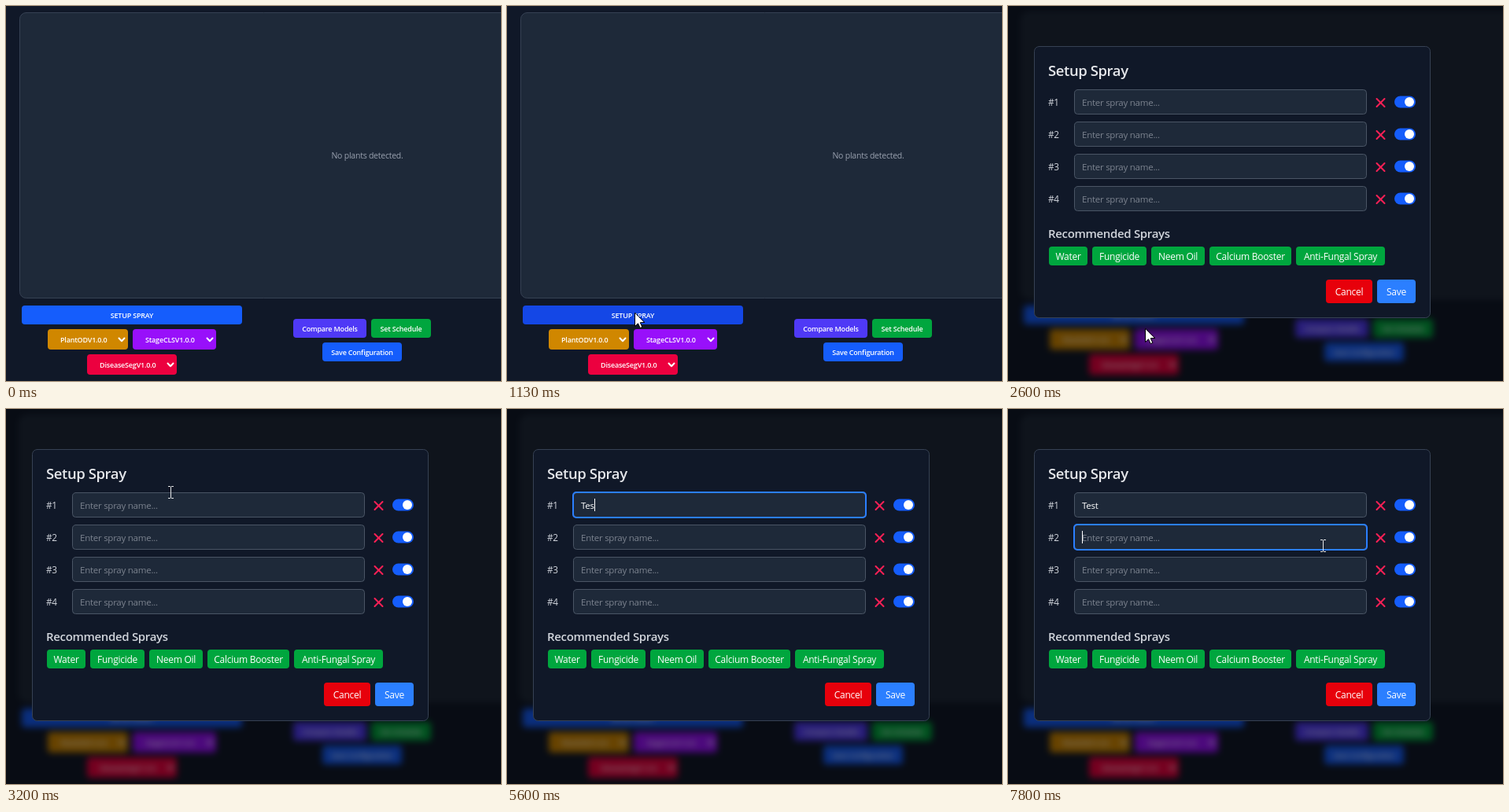
These frames come from a looping animation (629 px wide and 477 px high, 8000 ms). An HTML page with a canvas:

```html
<!DOCTYPE html>
<html lang="en">
<head>
<meta charset="utf-8">
<title>Spray setup</title>
<style>
html, body { margin: 0; width: 100%; height: 100%; overflow: hidden; background: #101828; }
canvas { display: block; }
</style>
</head>
<body>
<canvas id="stage" width="629" height="477"></canvas>
<script>
const W = 629, H = 477, LOOP = 8000, STEP = 1000 / 15, MARGIN = 20;
const ctx = document.getElementById('stage').getContext('2d');

// The page is drawn with a margin so that its blur has no soft outer edge.
const page = document.createElement('canvas');
page.width = W + 2 * MARGIN;
page.height = H + 2 * MARGIN;
const pageCtx = page.getContext('2d');

const OPEN = 1930, FOCUS_1 = 4670, FOCUS_2 = 7600;
const TYPING = [[5270, 'T'], [5470, 'Te'], [5600, 'Tes'], [5800, 'Test']];
const BLINK = 530;

// Pointer keys: time, x, y
const POINTER = [
  [130, 620, 458], [270, 560, 430], [470, 400, 385], [670, 262, 372],
  [800, 192, 380], [930, 166, 389], [1000, 162, 390],
  [2530, 162, 390], [2670, 186, 430], [2800, 230, 457], [2930, 280, 385],
  [3070, 262, 235], [3200, 209, 106], [3330, 151, 117], [3400, 154, 121],
  [3600, 164, 128], [3930, 146, 132],
  [6400, 146, 132], [6530, 245, 135], [6730, 432, 142], [6870, 446, 156],
  [7070, 428, 177], [7270, 412, 176], [7400, 400, 174]
];

const clamp = v => Math.min(1, Math.max(0, v));
const ramp = (t, from, to) => clamp((t - from) / (to - from));

function mix(a, b, k) {
  const part = (c, i) => parseInt(c.substr(1 + 2 * i, 2), 16);
  return `rgb(${[0, 1, 2].map(i => Math.round(part(a, i) + (part(b, i) - part(a, i)) * k))})`;
}

function box(c, x, y, w, h, r, fill, stroke, lineWidth = 1) {
  c.beginPath();
  c.roundRect(x, y, w, h, r);
  if (fill) { c.fillStyle = fill; c.fill(); }
  if (stroke) { c.strokeStyle = stroke; c.lineWidth = lineWidth; c.stroke(); }
}

function setFont(c, size, weight) {
  c.font = `${weight} ${size}px "Open Sans", "Noto Sans", sans-serif`;
  c.letterSpacing = `${-0.022 * size}px`;
}

function label(c, text, x, baseline, size, color, weight = 400, align = 'left') {
  setFont(c, size, weight);
  c.textAlign = align;
  c.fillStyle = color;
  c.fillText(text, x, baseline);
}

function line(c, points, color, width) {
  c.beginPath();
  points.forEach(([x, y]) => c.lineTo(x, y));
  c.strokeStyle = color;
  c.lineWidth = width;
  c.lineCap = c.lineJoin = 'round';
  c.stroke();
}

function button(c, text, x, y, w, h, color, size, weight) {
  box(c, x, y, w, h, 4, color);
  label(c, text, x + w / 2, y + h / 2 + 0.36 * size + 0.5, size, '#fff', weight, 'center');
}

function select(c, text, x, y, w, color) {
  box(c, x, y, w, 26, 4, color);
  label(c, text, x + 16, y + 16.5, 9, '#fff', 600);
  const cx = x + w - 8, cy = y + 13.5;
  line(c, [[cx - 3.5, cy - 2], [cx, cy + 1.7], [cx + 3.5, cy - 2]], '#fff', 2);
}

function drawPage(c, t) {
  const hover = ramp(t, 870, 1130) * (1 - ramp(t, OPEN, 2200));
  c.fillStyle = '#101828';
  c.fillRect(-MARGIN, -MARGIN, page.width, page.height);
  box(c, 17.5, 8.5, 900, 363, 8, '#1e2939', '#364153');
  label(c, 'No plants detected.', 459, 194, 10.5, '#99a1af', 400, 'center');
  button(c, 'SETUP SPRAY', 20, 381, 280, 24, mix('#155dfc', '#1447e6', hover), 9, 600);
  select(c, 'PlantODV1.0.0', 53, 411, 102, '#d08700');
  select(c, 'StageCLSV1.0.0', 161, 411, 106, '#9810fa');
  select(c, 'DiseaseSegV1.0.0', 103, 443, 114, '#ec003f');
  button(c, 'Compare Models', 365, 398, 93, 24, '#4f39f6', 9, 600);
  button(c, 'Set Schedule', 464, 398, 76, 24, '#00a63e', 9, 600);
  button(c, 'Save Configuration', 402, 428, 101, 24, '#155dfc', 9, 600);
}

function drawBackdrop(t) {
  pageCtx.setTransform(1, 0, 0, 1, MARGIN, MARGIN);
  drawPage(pageCtx, t);
  ctx.filter = 'blur(4px)';
  ctx.drawImage(page, -MARGIN, -MARGIN);
  ctx.filter = 'none';
  ctx.fillStyle = 'rgba(0, 0, 0, 0.5)';
  ctx.fillRect(0, 0, W, H);
}

function drawRow(index, text, focus, caret) {
  const y = 106 + 41 * index;
  label(ctx, `#${index + 1}`, 51, y + 20.5, 11.8, '#d1d5dc');
  box(ctx, 84.5, y + 0.5, 371, 31, 4, '#1e2939', '#4a5565');
  if (focus > 0) {
    ctx.globalAlpha = focus;
    box(ctx, 84, y, 372, 32, 4, null, '#2b7fff', 2);
    ctx.globalAlpha = 1;
  }
  label(ctx, text || 'Enter spray name...', 94, y + 21, 11.5, text ? '#fff' : '#7c838f');
  if (caret) {
    const x = 94 + Math.round(text ? ctx.measureText(text).width : 0);
    ctx.fillStyle = '#fff';
    ctx.fillRect(x, y + 8, 1, 16);
  }
  const cx = 473.5, cy = y + 17;
  line(ctx, [[cx - 5, cy - 5], [cx + 5, cy + 5]], '#ff2056', 2);
  line(ctx, [[cx + 5, cy - 5], [cx - 5, cy + 5]], '#ff2056', 2);
  box(ctx, 491, y + 8.5, 27, 15, 7.5, '#155dfc');
  box(ctx, 504, y + 10, 12, 12, 6, '#fff');
}

function drawDialog(t) {
  box(ctx, 33.5, 51.5, 503, 345, 6, '#101828', '#364153');
  label(ctx, 'Setup Spray', 51, 89, 18.5, '#e5e7eb', 600);

  const typed = TYPING.filter(([at]) => t >= at).pop();
  const text = typed ? typed[1] : '';
  const since = t >= FOCUS_2 ? FOCUS_2 : typed ? typed[0] : FOCUS_1;
  const lit = t >= FOCUS_1 && Math.floor((t - since) / BLINK) % 2 === 0;
  const moved = ramp(t, FOCUS_2, FOCUS_2 + 200);
  drawRow(0, text, ramp(t, FOCUS_1, FOCUS_1 + 200) * (1 - moved), lit && t < FOCUS_2);
  drawRow(1, '', moved, lit && t >= FOCUS_2);
  drawRow(2, '', 0, false);
  drawRow(3, '', 0, false);

  label(ctx, 'Recommended Sprays', 51, 295, 15, '#d1d5dc', 600);
  [['Water', 52, 49], ['Fungicide', 107, 69], ['Neem Oil', 182, 68],
   ['Calcium Booster', 256, 104], ['Anti-Fungal Spray', 366, 113]]
    .forEach(([name, x, w]) => button(ctx, name, x, 306, w, 24, '#00a63e', 12, 400));
  button(ctx, 'Cancel', 404, 348, 59, 30, '#e7000b', 12, 400);
  button(ctx, 'Save', 469, 348, 49, 30, '#2b7fff', 12, 400);
}

function pointerAt(t) {
  const next = POINTER.findIndex(key => key[0] > t);
  if (next < 0) return POINTER[POINTER.length - 1].slice(1);
  const [t0, x0, y0] = POINTER[next - 1], [t1, x1, y1] = POINTER[next];
  const k = ramp(t, t0, t1);
  return [Math.round(x0 + (x1 - x0) * k), Math.round(y0 + (y1 - y0) * k)];
}

function drawArrow(x, y) {
  ctx.beginPath();
  [[0, 0], [0, 17], [4, 13.3], [6.7, 19], [9.3, 17.9], [6.8, 12.2], [12, 12]]
    .forEach(([dx, dy]) => ctx.lineTo(x + 0.5 + dx, y + 0.5 + dy));
  ctx.closePath();
  ctx.fillStyle = '#fff';
  ctx.fill();
  ctx.strokeStyle = '#000';
  ctx.lineWidth = 1;
  ctx.lineJoin = 'miter';
  ctx.stroke();
}

function drawBeam(x, y) {
  ctx.fillStyle = '#e4e6e8';
  ctx.fillRect(x, y - 7, 1, 14);
  for (const end of [y - 8, y + 7]) {
    ctx.fillRect(x - 3, end, 3, 1);
    ctx.fillRect(x + 1, end, 3, 1);
  }
}

function drawPointer(t) {
  if (t < 130 || (t >= 5270 && t < 6470)) return;
  const [x, y] = pointerAt(t);
  const offset = y - 106;
  const overInput = t >= OPEN && x >= 84 && x <= 456 &&
    offset >= 0 && offset < 155 && offset % 41 <= 32;
  (overInput ? drawBeam : drawArrow)(x, y);
}

function draw(t) {
  if (t < OPEN) {
    drawPage(ctx, t);
  } else {
    drawBackdrop(t);
    drawDialog(t);
  }
  drawPointer(t);
}

const start = performance.now();
function tick() {
  const elapsed = (performance.now() - start) % LOOP;
  // Screen updates come at 15 per second, on a 10 ms clock.
  draw(Math.round(Math.floor((elapsed + 4) / STEP) * STEP / 10) * 10 % LOOP);
  requestAnimationFrame(tick);
}
tick();
</script>
</body>
</html>
```
